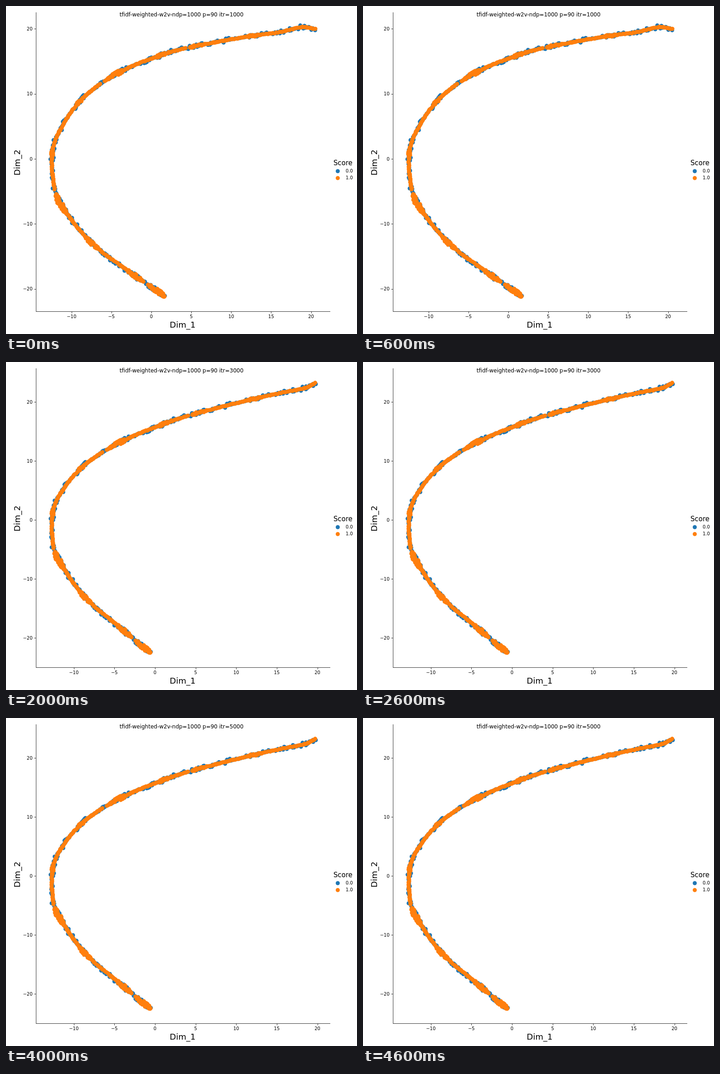
Write an HTML page with a canvas that moves like this. It is 775x723 px and loops after 5000 ms.

```html
<!DOCTYPE html>
<html lang="en">
<head>
<meta charset="utf-8">
<title>Scatter by iteration</title>
<style>
html, body { margin: 0; width: 100%; height: 100%; overflow: hidden; background: #fff; }
canvas { display: block; }
</style>
</head>
<body>
<canvas id="plot" width="775" height="723"></canvas>
<script>
const ctx = document.getElementById('plot').getContext('2d');
const BLUE = '#1f77b4', ORANGE = '#ff7f0e', AXIS = '#333';
const STEP = 1000, STEPS = 5, R = 4.5;

// Key points of the bend: x, y in the early layout, x, y in the late one,
// and the half width of the bulge of points there.
const keys = [
  [683, 51, 683, 46.5, 0], [655, 46.5, 660, 57.5, 0], [605, 57.5, 612, 67, 0],
  [543, 66, 545, 82, 3], [420, 88, 425, 112, 3], [347, 107, 353, 135, 3.5],
  [243, 150, 248, 179, 4.5], [165, 208, 169, 231, 3], [116, 280, 119, 292, 1.5],
  [102, 325, 103, 333, 2.5], [106, 395, 104, 402, 0], [121, 438, 117, 438, 5],
  [189, 522, 174, 518, 4], [284, 594, 260, 592, 4], [334, 628, 304, 629, 4.5],
  [350, 640, 319, 640, 0]
];
const last = keys.length - 1;

// Axis scales; col is where the layout's x, y start in a key.
const early = { col: 0, x0: 321, kx: 17.63, y0: 337, ky: 14.34 };
const late = { col: 2, x0: 329, kx: 17.93, y0: 348.3, ky: 13 };

// Distance along the bend at each key.
const at = [0];
for (let i = 1; i <= last; i++) {
  at[i] = at[i - 1] + Math.hypot(keys[i][0] - keys[i - 1][0], keys[i][1] - keys[i - 1][1]);
}
const LENGTH = at[last];

let seed = 29;
function rand() {
  seed = (seed * 1664525 + 1013904223) % 4294967296;
  return seed / 4294967296;
}
const spread = () => rand() * 2 - 1;

// A point is [distance along the bend, offset towards its inside].
function trail(pace, gapChance, offset) {
  const points = [];
  for (let s = 0; s < LENGTH; s += pace * (.4 + 1.2 * rand())) {
    if (rand() < gapChance) s += 9;
    points.push([s, offset()]);
  }
  return points;
}

function bulges(density) {
  return keys.flatMap(([, , , , w], i) =>
    Array.from({ length: w * w * density }, () => {
      const u = spread();
      return [at[i] + u * w * 5, spread() * w * Math.sqrt(1 - u * u)];
    }));
}

const blues = [...trail(3, 0, () => 4.5 * spread() ** 3), ...bulges(.8)];
const oranges = [...trail(2.2, .035, () => .9 * spread()), ...bulges(1.8), [LENGTH, 0]];

// Cubic through the keys: value and slope of one column at distance s.
function curve(col, s) {
  let i = 0;
  while (i < last - 1 && at[i + 1] < s) i++;
  const slope = j => {
    const a = Math.max(0, j - 1), b = Math.min(last, j + 1);
    return (keys[b][col] - keys[a][col]) / (at[b] - at[a]);
  };
  const len = at[i + 1] - at[i], u = (s - at[i]) / len;
  const p = keys[i][col], d = keys[i + 1][col] - p;
  const m = slope(i) * len, n = slope(i + 1) * len;
  const q = 3 * d - 2 * m - n, r = m + n - 2 * d;
  return [p + u * (m + u * (q + u * r)), m + u * (2 * q + 3 * u * r)];
}

function dot(x, y, color) {
  ctx.fillStyle = color;
  ctx.beginPath();
  ctx.arc(x, y, R, 0, 7);
  ctx.fill();
}

function drawPoints(points, col, color) {
  for (const [pos, off] of points) {
    const s = Math.max(0, Math.min(LENGTH, pos));
    const [x, dx] = curve(col, s), [y, dy] = curve(col + 1, s);
    const len = Math.hypot(dx, dy);
    dot(x + dy / len * off, y - dx / len * off, color);
  }
}

function text(str, x, y, size, align = 'center') {
  ctx.fillStyle = '#000';
  ctx.font = size + 'px "DejaVu Sans", sans-serif';
  ctx.textAlign = align;
  ctx.fillText(str, x, y);
}

function bar(x, y, w, h) {
  ctx.fillStyle = AXIS;
  ctx.fillRect(x, y, w, h);
}

const label = v => String(v).replace('-', '\u2212');

function drawAxes(view) {
  bar(66, 14, 1, 660);
  bar(66, 673, 650, 1);
  for (let v = -10; v <= 20; v += 5) {
    const x = view.x0 + v * view.kx;
    bar(Math.round(x), 674, 1, 3.5);
    text(label(v), x, 688, 10);
  }
  for (let v = -20; v <= 20; v += 10) {
    const y = view.y0 - v * view.ky;
    bar(62.5, Math.round(y), 3.5, 1);
    text(label(v), 58.5, Math.round(y + 3.6), 10, 'right');
  }
  text('Dim_1', 390, 709, 18);
  ctx.save();
  ctx.translate(31, 345);
  ctx.rotate(-Math.PI / 2);
  text('Dim_2', 0, 0, 18);
  ctx.restore();
}

function drawLegend() {
  text('Score', 723, 351, 15, 'left');
  dot(732.5, 364, BLUE);
  dot(732.5, 379.3, ORANGE);
  text('0.0', 750, 367, 10, 'left');
  text('1.0', 750, 382, 10, 'left');
}

function draw(step) {
  const view = step ? late : early;
  ctx.fillStyle = '#fff';
  ctx.fillRect(0, 0, 775, 723);
  drawPoints(blues, view.col, BLUE);
  drawPoints(oranges, view.col, ORANGE);
  drawAxes(view);
  drawLegend();
  text(`tfidf-weighted-w2v-ndp=1000 p=90 itr=${(step + 1) * 1000}`, 387.5, 23, 12);
}

const start = performance.now();
let shown = -1;
function tick() {
  const step = Math.floor((performance.now() - start) / STEP) % STEPS;
  if (step !== shown) draw(shown = step);
  requestAnimationFrame(tick);
}
tick();
</script>
</body>
</html>
```
